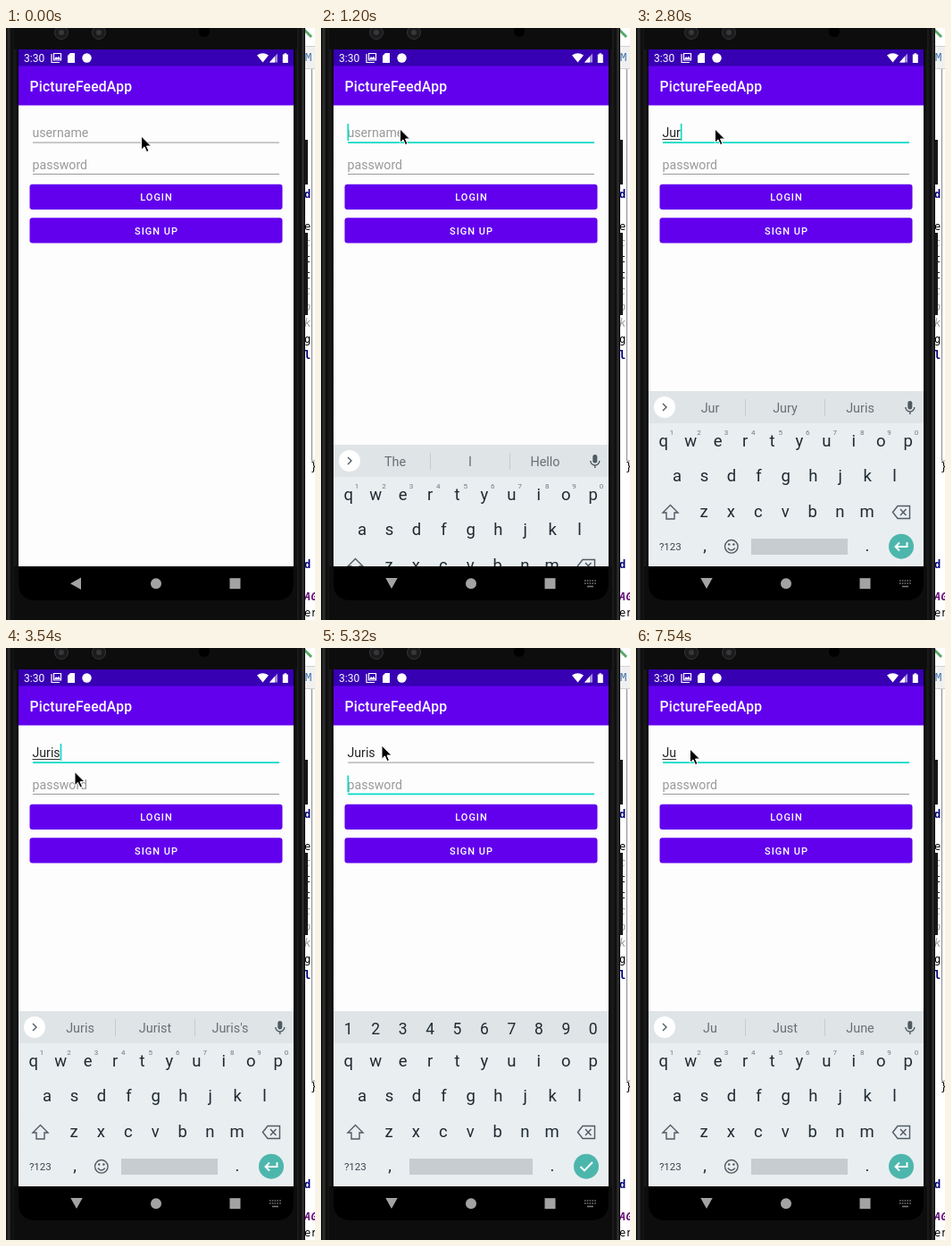
Animation of 346x662 px, one loop 7990 ms. Source, as an HTML page:

```html
<!DOCTYPE html>
<html lang="en">
<head>
<meta charset="utf-8">
<title>Login screen</title>
<style>
html, body { margin: 0; width: 100%; height: 100%; overflow: hidden; background: #fff; }
svg { display: block; width: 346px; height: 662px; font-family: Roboto, sans-serif; }
.mid { text-anchor: middle; }
.field { font-size: 14.15px; fill: #222; }
.hint { fill: #999; }
.btn { font-size: 11px; font-weight: 500; letter-spacing: .98px; fill: #fff; text-anchor: middle; }
.key { font-size: 18.5px; fill: #1f2b31; text-anchor: middle; }
.num { font-size: 8px; fill: #6b7a82; text-anchor: middle; }
.tip { font-size: 14.4px; fill: #667075; text-anchor: middle; }
.code { font: 12px "DejaVu Sans Mono", monospace; }
.line { fill: none; stroke: #4f5b62; stroke-width: 1.4; }
</style>
</head>
<body>
<svg viewBox="0 0 346 662">
  <defs>
    <linearGradient id="edge">
      <stop offset="0" stop-color="#050505"/>
      <stop offset=".009" stop-color="#333"/>
      <stop offset=".018" stop-color="#0b0b0b"/>
      <stop offset=".03" stop-color="#1c1c1c"/>
      <stop offset=".042" stop-color="#050505"/>
      <stop offset=".962" stop-color="#050505"/>
      <stop offset=".975" stop-color="#1c1c1c"/>
      <stop offset=".985" stop-color="#0b0b0b"/>
      <stop offset=".993" stop-color="#333"/>
      <stop offset="1" stop-color="#050505"/>
    </linearGradient>
    <clipPath id="view"><path d="M14 24h308v578H14z"/></clipPath>
  </defs>

  <!-- editor behind the phone -->
  <path d="M330 0h16v662h-16z" fill="#fff"/>
  <path d="M330 20h16v25h-16z" fill="#f0f0f0"/>
  <path d="M334 2l8 8" stroke="#59a869" stroke-width="3"/>
  <path d="M335 20.5h11M335 45.5h11" stroke="#d0d0d0"/>
  <path d="M342.5 46v438h4" fill="none" stroke="#8a8a8a"/>
  <g id="code" class="code"></g>

  <!-- phone -->
  <path d="M333 125h5v50h-5zM333 229h5v92h-5z" fill="#1a1a1a"/>
  <path d="M0 0h335v662H0z" fill="url(#edge)"/>
  <path d="M9 0h317v24H9zM9 602h317v60H9z" fill="#0d0d0d"/>
  <g fill="#1b1b1d" stroke="#343436">
    <circle cx="62" cy="5" r="7.5"/><circle cx="104" cy="5" r="7.5"/>
  </g>
  <g fill="#3a3638"><circle cx="62" cy="5" r="3"/><circle cx="104" cy="5" r="3"/></g>
  <circle cx="222" cy="4" r="6"/>
  <path d="M14 602h308v18q0 20-20 20H34q-20 0-20-20z"/>

  <!-- app -->
  <path d="M14 24h308v578H14z" fill="#fdfdfd"/>
  <path d="M14 24h308v19H14z" fill="#3700b3"/>
  <path d="M14 42.5h308v44H14z" fill="#6200ee"/>
  <g fill="#fff">
    <text x="20" y="38" font-size="12">3:30</text>
    <path d="M51 29v9.500h9" fill="none" stroke="#fff" stroke-width="1.200"/>
    <path d="M53.500 28.500h8v7.500h-8z" fill="none" stroke="#fff" stroke-width="1.200"/>
    <path d="M54 35l2-3 1.500 1.500 1.500-2 2 3.500z"/>
    <path d="M72 28h5v11h-8v-8z"/>
    <circle cx="90.500" cy="33.500" r="5.200"/>
    <path d="M281 30.500q6.500-4.500 13 0l-6.500 8z"/>
    <path d="M295 38.500l9-10v10z" opacity=".55"/><path d="M295 38.500l6-6.700v6.700z"/>
    <path d="M309.800 29.500h1.700v-1.200h2.600v1.200h1.700v9.500h-6z"/>
    <text x="26.500" y="71" font-size="15.700" font-weight="500" letter-spacing=".2">PictureFeedApp</text>
  </g>
  <path id="userLine" d="M30 128.100h276"/>
  <path id="passLine" d="M30 163.400h276"/>
  <path id="under" stroke="#333" stroke-width="1"/>
  <text id="user" class="field" x="29.500" y="122"></text>
  <text class="field hint" x="29.500" y="157.500">password</text>
  <rect id="caret" width="1.600" height="19" fill="#03dac5"/>
  <path id="drop" d="M0 0l5.500 5.200a7.700 7.700 0 1 1-11 0z" fill="#17d3c3"/>
  <g fill="#6200ee">
    <rect x="26.500" y="174.800" width="283" height="28.200" rx="3"/>
    <rect x="26.500" y="212.300" width="283" height="28.200" rx="3"/>
  </g>
  <text class="btn" x="168.500" y="193">LOGIN</text>
  <text class="btn" x="168.500" y="230.700">SIGN UP</text>

  <!-- keyboard -->
  <g clip-path="url(#view)"><g id="board">
    <path d="M14 406h308v196H14z" fill="#e9eef1"/>
    <path d="M14 406h308v36H14z" fill="#dfe4e7"/>
    <g id="keys"></g>
    <g id="tips">
      <circle cx="32" cy="424" r="12" fill="#fff"/>
      <path class="line" d="M30 420l4 4-4 4"/>
      <path d="M122.500 415v19M211.500 415v19" stroke="#c5ccd0"/>
      <rect x="304.300" y="417" width="5" height="9.500" rx="2.500" fill="#4f5b62"/>
      <path class="line" d="M301.800 424a5 5 0 0 0 10 0M306.800 429v3"/>
    </g>
    <path class="line" d="M38.500 533.500l8.500 8.500h-4v7h-9v-7h-4z"/>
    <path class="line" d="M287.500 541.500l5.500-7h13.500v14H293zM296 538l6.500 7M302.500 538l-6.500 7"/>
    <text x="38.300" y="584" class="mid" font-size="11.500" fill="#37454c">?123</text>
    <text x="77" y="585" class="key">,</text>
    <text x="259" y="585" class="key">.</text>
    <path id="space" fill="#c7ccd0"/>
    <g id="smile">
      <circle class="line" cx="106.800" cy="579.800" r="7.300"/>
      <path class="line" d="M102.800 581.500q4 5 8 0"/>
      <circle cx="104.200" cy="577.500" r="1.200" fill="#4f5b62"/>
      <circle cx="109.400" cy="577.500" r="1.200" fill="#4f5b62"/>
    </g>
    <circle cx="297" cy="579.700" r="14" fill="#4db6ac"/>
    <path id="enter" fill="none" stroke="#fff" stroke-width="1.900"/>
  </g></g>

  <!-- navigation -->
  <g fill="#a3a3a3">
    <path id="back"/>
    <circle cx="168" cy="621.200" r="6"/>
    <path d="M250.500 615.200h12v12h-12z"/>
  </g>
  <g id="switcher" stroke="#777" stroke-width="1.600">
    <path d="M295 618h13M295 621h13" stroke-dasharray="1.600 1.200"/><path d="M298 624.500h7"/>
  </g>
  <path id="mouse" d="M0 0v15.200l3.500-3.300 2.500 5.700 2.500-1.100-2.500-5.500h5z" stroke="#fff" stroke-width="1"/>
</svg>
<script>
const $ = id => document.getElementById(id);
const LOOP = 7990, TEAL = '#03dac5', START = 29.5;

function label(parent, text, x, y, cls, style = '') {
  const el = document.createElementNS('http://www.w3.org/2000/svg', 'text');
  el.setAttribute('x', x);
  el.setAttribute('y', y);
  el.setAttribute('class', cls);
  el.style.cssText = style;
  el.textContent = text;
  parent.append(el);
  return el;
}
const set = (id, name, value) => $(id).setAttribute(name, value);
const show = (el, on) => { el.style.display = on ? '' : 'none'; };

// Visible slivers of the editor text
const navy = 'fill:#000080;font-weight:bold', gray = 'fill:#999;font-style:italic';
[['M', 37, 'fill:#3b6ea8', 335], ['d', 190, navy], ['e', 226], ['c', 244, gray], ['t', 262],
 ['t', 280], ['c', 298, gray], ['p', 316, gray], ['k', 334, gray], ['g', 352], ['l', 370, navy],
 ['}', 495, '', 341], ['d', 604, navy],
 ['AG', 640, 'fill:#660e7a;font-weight:bold;font-style:italic'], ['er', 658]
].forEach(([s, y, style, x = 334]) => label($('code'), s, x, y, 'code', style));

// Key rows
const PITCH = 30.45, plain = [], secret = [];
[['qwertyuiop', 30.7, 468], ['asdfghjkl', 46, 507], ['zxcvbnm', 76, 547]].forEach(([row, x, y]) =>
  [...row].forEach((c, i) => label($('keys'), c, x + i * PITCH, y, 'key')));
[...'1234567890'].forEach((c, i) => {
  const x = 30.7 + i * PITCH;
  plain.push(label($('keys'), c, x + 9.3, 455, 'num'));
  secret.push(label($('keys'), c, x, 431.5, 'key', 'font-size:17.5px'));
});
const tips = [83, 167, 251].map(x => label($('tips'), '', x, 430, 'tip'));

// Each step overrides part of the state before it
const steps = [
  [0, { mouse: [151.5, 121], text: '', focus: '', caret: 0, drop: 0, board: null, pad: 0,
        back: 'left', nav: 0, tips: ['The', 'I', 'Hello'], bold: 0 }],
  [320, { mouse: [145, 120] }],
  [470, { mouse: [124, 117] }],
  [610, { mouse: [101, 114] }],
  [760, { mouse: [88.5, 113] }],
  [900, { focus: 'user', caret: 1 }],
  [1050, { nav: 1 }],
  [1200, { board: 60, back: 'down' }],
  [1340, { board: 0 }],
  [1490, { caret: 0 }],
  [1910, { text: 'J', caret: 1, tips: ['J', 'Just', 'I'], bold: 1 }],
  [2210, { text: 'Ju', tips: ['Ju', 'Just', 'June'], bold: 0 }],
  [2660, { caret: 0 }],
  [2800, { text: 'Jur', caret: 1, tips: ['Jur', 'Jury', 'Juris'] }],
  [3100, { text: 'Juri', tips: ['Juri', 'Juris', 'Jurist'] }],
  [3240, { text: 'Juris', tips: ['Juris', 'Jurist', "Juris's"] }],
  [3540, { mouse: [77, 138.5] }],
  [3690, { mouse: [71, 149] }],
  [3840, { mouse: [70, 151] }],
  [3990, { focus: 'pass', pad: 1 }],
  [4580, { caret: 0 }],
  [5020, { caret: 1, mouse: [70, 146] }],
  [5170, { mouse: [70, 129] }],
  [5310, { mouse: [68, 109] }],
  [5460, { mouse: [65, 98], caret: 0 }],
  [5610, { mouse: [62, 106] }],
  [5760, { mouse: [60.5, 113] }],
  [5910, { focus: 'user', caret: 1, pad: 0 }],
  [6060, { drop: 1 }],
  [6360, { caret: 0 }],
  [6500, { text: 'Juri', caret: 1, drop: 0 }],
  [6650, { tips: ['Juri', 'Juris', 'Jurist'] }],
  [6800, { text: 'Jur', tips: ['Jur', 'Jury', 'Juris'] }],
  [6950, { text: 'Ju' }],
  [7090, { tips: ['Ju', 'Just', 'June'] }],
  [7540, { caret: 0 }]
];
let acc = {};
const states = steps.map(([t, change]) => [t, acc = { ...acc, ...change }]);

function drawField(id, on) {
  set(id, 'stroke', on ? TEAL : '#8c8c8c');
  set(id, 'stroke-width', on ? 1.7 : 0.9);
}

function draw(s) {
  const inUser = s.focus === 'user', user = $('user');
  user.textContent = s.text || 'username';
  user.classList.toggle('hint', !s.text);
  const width = s.text ? user.getComputedTextLength() : 0;
  const end = START + (inUser ? width : 0);

  drawField('userLine', inUser);
  drawField('passLine', s.focus === 'pass');
  set('under', 'd', `M${START} 124.5h${width}`);
  show($('under'), inUser && s.text);
  set('caret', 'x', end);
  set('caret', 'y', inUser ? 107 : 142.5);
  show($('caret'), s.caret);
  set('drop', 'transform', `translate(${end + 0.8} 126.5)`);
  show($('drop'), s.drop);

  show($('board'), s.board !== null);
  set('board', 'transform', `translate(0 ${s.board || 0})`);
  show($('tips'), !s.pad);
  show($('smile'), !s.pad);
  plain.forEach(el => show(el, !s.pad));
  secret.forEach(el => show(el, s.pad));
  set('space', 'd', `M${s.pad ? 99 : 129} 571H237v18H${s.pad ? 99 : 129}z`);
  set('enter', 'd', s.pad ? 'M290.5 580l4.500 4.500 9-9.500' : 'M303.500 575v5h-12.500M295 575.500l-4.500 4.500 4.500 4.500');
  tips.forEach((el, i) => {
    const bold = s.bold && i === 1;
    el.textContent = s.tips[i];
    el.style.fontWeight = bold ? 700 : 400;
    el.style.fill = bold ? '#111' : '';
  });

  set('back', 'd', s.back === 'left' ? 'M72 621.200l12-6.700v13.400z' : 'M72.300 615h13.400l-6.700 12z');
  show($('switcher'), s.nav);
  set('mouse', 'transform', `translate(${s.mouse})`);
}

const begin = performance.now();
let shown;
function tick() {
  const t = (performance.now() - begin) % LOOP;
  const state = states.findLast(([at]) => at <= t)[1];
  if (state !== shown) draw(shown = state);
  requestAnimationFrame(tick);
}
tick();
</script>
</body>
</html>
```
